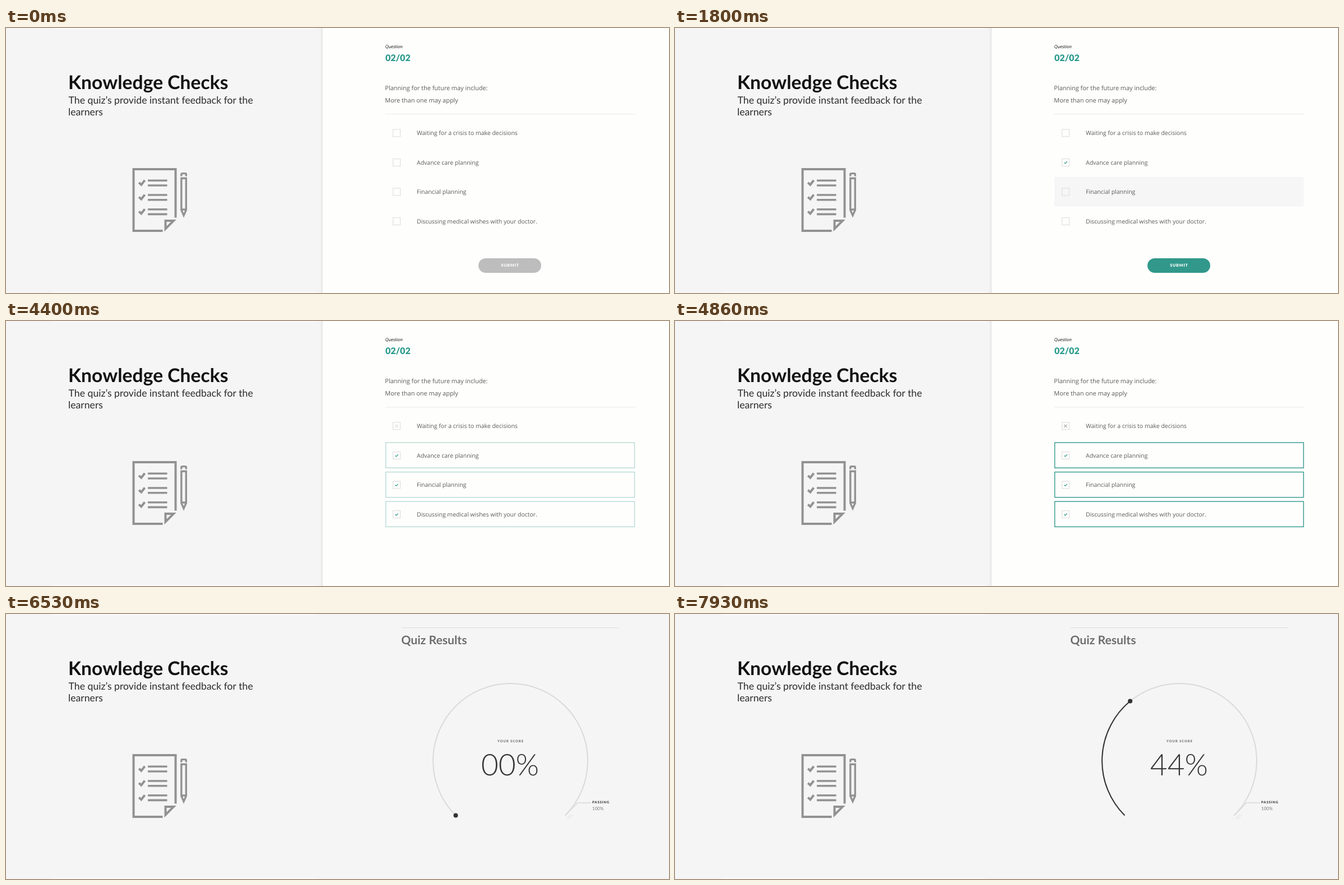
These frames come from a looping animation (1183 by 473 pixels, 8 s). An HTML page:

```html
<!DOCTYPE html>
<html lang="en">
<head>
<meta charset="utf-8">
<title>Knowledge Checks</title>
<style>
  html, body { margin: 0; width: 100%; height: 100%; overflow: hidden; background: #f5f5f5; }
  svg { display: block; width: 1183px; height: 473px; }
  text { font-family: Lato, sans-serif; text-rendering: geometricPrecision; }
  .sans { font-family: "Open Sans", sans-serif; fill: #5a5a5a; }
  .mid { text-anchor: middle; }
  .bold { font-weight: 700; }
  .black { font-weight: 900; }
  .line { fill: none; }
  #card > rect:first-child { filter: drop-shadow(0 7px 2.5px rgba(0, 0, 0, .14)); }
</style>
</head>
<body>
<svg viewBox="0 0 1183 473">
  <rect width="1183" height="473" fill="#f5f5f5"/>
  <path d="M84 0H554V1.5H84ZM84 471.5H554V473H84Z" fill="#fff"/>

  <text class="bold" x="111" y="108.5" font-size="33.7" fill="#111">Knowledge Checks</text>
  <text x="111.5" y="135" font-size="17.7" fill="#2b2b2b">The quiz’s provide instant feedback for the</text>
  <text x="111" y="156.3" font-size="17.7" fill="#2b2b2b">learners</text>

  <g class="line" stroke="#929292" stroke-width="4" transform="translate(-.4 0)">
    <path d="M303 338.500V252H228V362H280"/>
    <path d="M285 344H299.500L285 358.500Z"/>
    <g id="list" stroke-width="3.6"></g>
    <g stroke-width="3.4">
      <path d="M313.300 264.500V261Q313.300 259.600 315 259.600H320Q321.800 259.600 321.800 261V264.500"/>
      <path d="M313.300 268.300H321.800V325L317.500 334.500L313.300 325ZM313.300 324H321.800"/>
    </g>
  </g>

  <g id="results">
    <path d="M706 24.500H1094" stroke="#dedede"/>
    <text class="bold" x="705.300" y="54.200" font-size="21.2" fill="#6e6e6e">Quiz Results</text>
    <g class="line" stroke="#dadada">
      <path id="track" stroke-width="2"/>
      <path d="M998 359.500L1020 337H1044" stroke-width="1.500"/>
      <path d="M1001 364.500L1007.500 358M1003 367L1012 358"/>
    </g>
    <path id="arc" class="line" stroke="#333" stroke-width="2"/>
    <circle id="dot" r="4" fill="#333"/>
    <text class="black mid" x="900.400" y="228.500" font-size="6" letter-spacing=".95" fill="#777">YOUR SCORE</text>
    <text id="score" class="mid" x="899.400" y="287.600" font-size="53.2" font-weight="300" fill="#333"></text>
    <text class="black" x="1046" y="338.300" font-size="6" letter-spacing=".8" fill="#444">PASSING</text>
    <text x="1046" y="349.500" font-size="8" fill="#777">100%</text>
  </g>

  <g id="card">
    <rect x="565" y="-29" width="640" height="760" rx="2" fill="#fefefd"/>
    <text class="sans" x="676.800" y="36.300" font-size="7.9" font-style="italic" font-weight="500" style="fill:#111">Question</text>
    <text class="black" x="676.900" y="59" font-size="16" fill="#2a9a8c">02/02</text>
    <text class="sans" x="676.300" y="111" font-size="10.95">Planning for the future may include:</text>
    <text class="sans" x="676.300" y="133.400" font-size="10.95">More than one may apply</text>
    <path d="M677 153.800H1123" stroke="#e9e9e9"/>
    <g id="rows"></g>
    <g id="button">
      <rect x="843" y="411" width="112" height="26" rx="13"/>
      <text class="black mid" x="899.400" y="426.400" font-size="7.2" letter-spacing=".8" fill="#fff">SUBMIT</text>
    </g>
    <g id="feedback">
      <g class="line" stroke="#2a9a8c" stroke-width="1.500">
        <circle id="ring" cx="898.500" cy="427" r="15" pathLength="1" stroke-dasharray="1 2" transform="rotate(-90 898.500 427)"/>
        <path id="tick" d="M892 427.500L896.700 432L905 423" pathLength="1" stroke-dasharray="1 2"/>
      </g>
      <text id="verdict" class="sans mid" x="898.500" y="462" font-size="11.5">Correct</text>
    </g>
  </g>
</svg>
<script>
const LOOP = 8000, FRAME = 200 / 3, TEAL = "#31988b";
const $ = id => document.getElementById(id);
const set = (el, attrs) => { for (const k in attrs) el.setAttribute(k, attrs[k]); };
const ramp = (t, a, b) => Math.min(1, Math.max(0, (t - a) / (b - a)));
const easeOut = x => 1 - (1 - x) ** 2;
const easeInOut = (x, n) => x < .5 ? 2 ** (n - 1) * x ** n : 1 - (2 - 2 * x) ** n / 2;
const mix = (a, b, p) => `rgb(${a.map((v, i) => Math.round(v + (b[i] - v) * p))})`;

// checked: fade-in of the mark; hover: spans [from, to)
const options = [
  { label: "Waiting for a crisis to make decisions", hover: [] },
  { label: "Advance care planning", checked: [1540, 1780], hover: [[860, 1790]] },
  { label: "Financial planning", checked: [2270, 2510], hover: [[800, 860], [1790, 2520]] },
  { label: "Discussing medical wishes with your doctor.", checked: [2940, 3240], hover: [[2520, 3400]] }
];

$("list").innerHTML = [0, 25.7, 51.4].map(y => `<g transform="translate(0 ${y})">
  <path d="M237.600 276L241.800 279.800L248 271.800" stroke-width="4"/>
  <path d="M253.500 272.300H288M253.500 281H288"/></g>`).join("");

$("rows").innerHTML = options.map((o, i) => {
  const mark = o.checked
    ? `<path class="mark line" d="M694.400 .2L696.300 2L699.700 -1.700" stroke="${TEAL}" stroke-width="1.200"/>`
    : `<path class="mark line" d="M694.200 -2.500L699.400 2.700M699.400 -2.500L694.200 2.700" stroke="#777" stroke-width="1"/>`;
  const frame = o.checked
    ? `<rect class="frame line" x="677.600" y="-22.900" width="443.900" height="45.200" stroke="${TEAL}" stroke-width="1.400"/>` : "";
  return `<g transform="translate(0 ${187.4 + i * 52.55})">
    <rect class="hover" x="677" y="-26.600" width="445" height="52.600" fill="#f6f6f7"/>${frame}
    <rect class="line" x="690.500" y="-6.500" width="13" height="13" stroke="#dcdcdc"/>${mark}
    <text class="sans" x="733" y="3.800" font-size="10.5">${o.label}</text></g>`;
}).join("");
const rows = [...$("rows").children];

// Gauge: 270 degrees, clockwise from the lower left
const point = p => {
  const a = (135 + 270 * p) * Math.PI / 180;
  return [900 + 138 * Math.cos(a), 262 + 138 * Math.sin(a)];
};
const gauge = p => `M${point(0)}A138 138 0 ${+(p > 2 / 3)} 1 ${point(p)}`;
set($("track"), { d: gauge(1) });

function drawCard(t) {
  const shift = Math.round(Math.max(0, (t - 6263) * 2.3));
  set($("card"), { transform: `translate(0 ${shift})`, visibility: shift > 500 ? "hidden" : "visible" });

  const reveal = easeOut(ramp(t, 4290, 4860));
  rows.forEach((row, i) => {
    const { checked, hover } = options[i];
    const part = name => row.querySelector(name);
    set(part(".hover"), { opacity: +hover.some(([a, b]) => t >= a && t < b) });
    set(part(".mark"), { opacity: checked ? ramp(t, ...checked) : reveal });
    if (checked) set(part(".frame"), { opacity: reveal });
  });

  set($("button").firstElementChild, {
    fill: mix([189, 189, 189], [49, 152, 139], ramp(t, 1540, 1790)),
    "fill-opacity": 1 - .2 * easeOut(ramp(t, 3550, 3730))
  });
  set($("button"), { opacity: 1 - ramp(t, 4000, 4300) });

  const ring = easeOut(ramp(t, 5070, 5470)), tick = easeOut(ramp(t, 5400, 5730));
  set($("ring"), { "stroke-dashoffset": 1 - ring, opacity: +(ring > 0) });
  set($("tick"), { "stroke-dashoffset": 1 - tick, opacity: +(tick > 0) });
  set($("verdict"), { opacity: ramp(t, 5270, 5730) });
}

function drawResults(t) {
  const count = Math.round(100 * easeInOut(ramp(t, 6990, 8990), 2));
  $("score").textContent = String(count).padStart(2, "0") + "%";
  const p = easeInOut(ramp(t, 6997, 8997), 5);
  const [cx, cy] = point(p);
  set($("arc"), { d: gauge(p) });
  set($("dot"), { cx, cy });
}

// Motion advances 15 times a second, on times rounded down to 10 ms
function stepTime(t) {
  const at = k => Math.floor(k * FRAME / 10 + 1e-6) * 10;
  const k = Math.floor((t + 7) / FRAME);
  return at(k) > t ? at(k - 1) : at(k);
}

function tick() {
  const t = stepTime(performance.now() % LOOP);
  drawCard(t);
  drawResults(t);
  requestAnimationFrame(tick);
}
tick();
</script>
</body>
</html>
```
